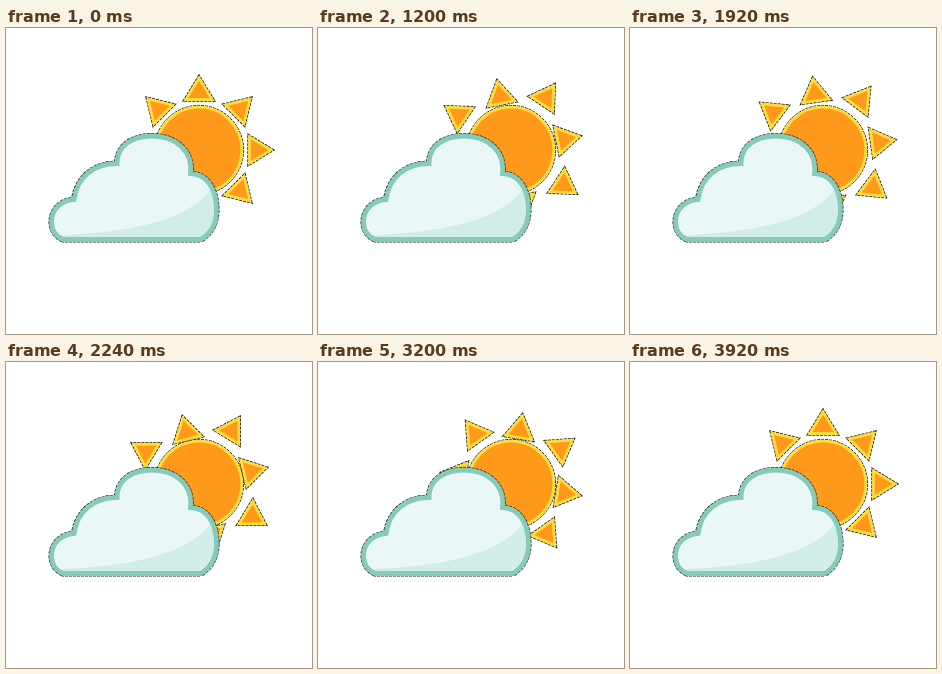
Animation of 306 by 306 pixels, one loop 4000 ms. Source, as an HTML page:

```html
<!DOCTYPE html>
<html lang="en">
<head>
<meta charset="utf-8">
<title>Sun behind a cloud</title>
<style>
html, body { margin: 0; width: 100%; height: 100%; overflow: hidden; background: #fff; }
svg { display: block; width: 306px; height: 306px; }
.edge { fill: none; stroke: #1c1c1c; stroke-dasharray: 3 1; }
</style>
</head>
<body>
<svg viewBox="0 0 306 306">
  <defs>
    <g id="ray">
      <path class="edge" stroke-width="1.2" d="M17.4 0L-8.8 -16V16Z"/>
      <path fill="#fddc38" d="M17 0L-8.6 -15.6V15.6Z"/>
      <path fill="#ff991b" d="M11.6 0L-5.8 -10.7V10.7Z"/>
    </g>
    <path id="cloud" d="M57 211.5C49 208 45.5 201 45.5 194C45.5 181 56 172 68 171.5C71 149 88 135.5 111 135.5C111 118 126 108 146 108C171 108 187 124 184.5 145.5C201 146 210.5 161 210.5 182C210.5 196 204 206 195 211.5Z"/>
    <clipPath id="inside"><use href="#cloud"/></clipPath>
  </defs>
  <circle class="edge" cx="193" cy="122" r="44.6" stroke-width="1"/>
  <circle cx="193" cy="122" r="42.8" fill="#ff991b" stroke="#fddc38" stroke-width="2.8"/>
  <g id="rays"></g>
  <use href="#cloud" class="edge" stroke-width="6"/>
  <use href="#cloud" fill="#ebf6f6"/>
  <path clip-path="url(#inside)" fill="#d1edea" d="M54 207C110 205 186 196 207 157L216 160V214H54Z"/>
  <use href="#cloud" fill="none" stroke="#86cbb9" stroke-width="4.8"/>
</svg>
<script>
const LOOP = 4000, STEP = 80, COUNT = 8;
const LAST = LOOP - STEP;
const GAP = 360 / COUNT;
const SWAY = [7, -3, -7, -2]; // strength of each harmonic, in degrees
const group = document.getElementById("rays");

const rays = Array.from({ length: COUNT }, () => {
  const ray = document.createElementNS("http://www.w3.org/2000/svg", "use");
  ray.setAttribute("href", "#ray");
  return group.appendChild(ray);
});

// Each ray drifts back to its neighbour's place, swaying on the way
const turn = u => SWAY.reduce(
  (sum, k, i) => sum + k * Math.sin((i + 1) * Math.PI * u), -GAP * u);

// The path dips near the axes and bulges near the diagonals
function reach(degrees, u) {
  const a = 4 * degrees * Math.PI / 180;
  const swell = 4 * Math.exp(-(((u - 0.41) / 0.09) ** 2));
  return 57.7 - 2.8 * (Math.cos(a) - Math.cos(3 * a)) + swell;
}

function draw(time) {
  const u = Math.floor((time % LOOP) / STEP) * STEP / LAST;
  rays.forEach((ray, i) => {
    const angle = turn(u) + i * GAP;
    ray.setAttribute("transform",
      `translate(193 122) rotate(${angle}) translate(${reach(angle, u)} 0)`);
  });
}

const start = performance.now();
function tick() {
  draw(performance.now() - start);
  requestAnimationFrame(tick);
}
draw(0);
requestAnimationFrame(tick);
</script>
</body>
</html>
```
